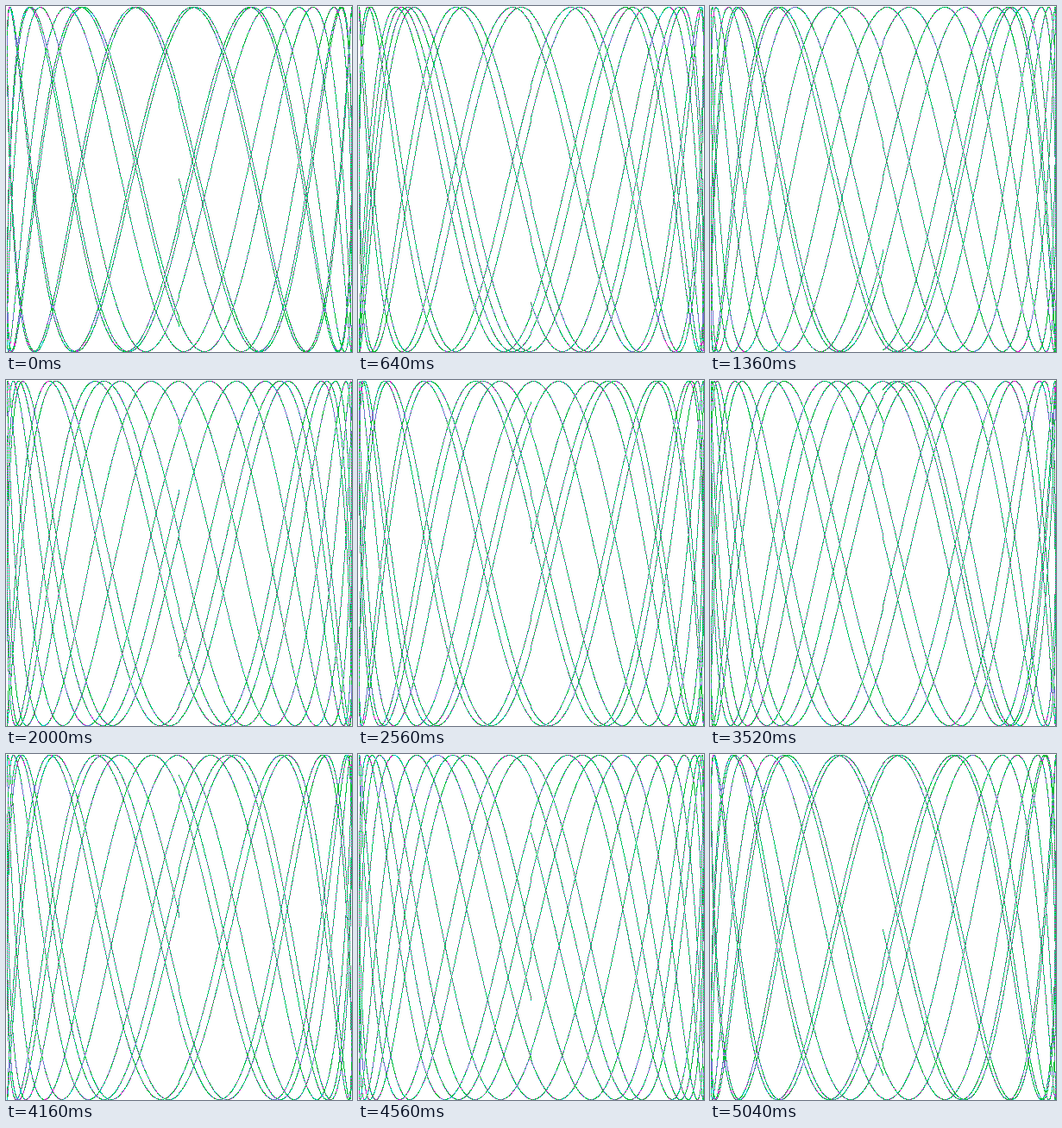
Write an HTML page with a canvas that moves like this. It is 401 by 401 pixels and loops after 5120 ms.

```html
<!DOCTYPE html>
<html lang="en">
<head>
<meta charset="utf-8">
<title>Lissajous</title>
<style>
  html, body { margin: 0; width: 100%; height: 100%; overflow: hidden; background: #fff; }
  canvas { display: block; width: 401px; height: 401px; image-rendering: pixelated; }
</style>
</head>
<body>
<canvas width="401" height="401"></canvas>
<script>
const SIZE = 200;
const WIDTH = 2 * SIZE + 1;
const CYCLES = 5;
const STEP = 0.001;
const FREQ = 7 * 0.6046602879796196;
const FRAMES = 64;
const DELAY = 80;

// Little-endian ABGR
const WHITE = 0xffffffff;
const GREEN = 0xff33bb00;
const MAGENTA = 0xffcc22dd;
const CYAN = 0xffcccc00;
const INKS = [GREEN, MAGENTA, GREEN, CYAN];

const ctx = document.querySelector('canvas').getContext('2d');
const image = ctx.createImageData(WIDTH, WIDTH);
const pixels = new Uint32Array(image.data.buffer);

// Truncation toward zero gives the small kink along both axes.
const place = v => SIZE + Math.trunc(v * SIZE + 0.5);

function draw(phase) {
  pixels.fill(WHITE);
  const count = CYCLES * 2 * Math.PI / STEP;
  for (let i = 0; i < count; i++) {
    const t = i * STEP;
    const x = place(Math.sin(t));
    const y = place(Math.sin(t * FREQ + phase));
    pixels[y * WIDTH + x] = INKS[i % INKS.length];
  }
  ctx.putImageData(image, 0, 0);
}

let shown = -1;
const start = performance.now();

function tick() {
  const frame = Math.floor((performance.now() - start) / DELAY) % FRAMES;
  if (frame !== shown) {
    shown = frame;
    draw(frame * 0.1);
  }
  requestAnimationFrame(tick);
}
tick();
</script>
</body>
</html>
```
